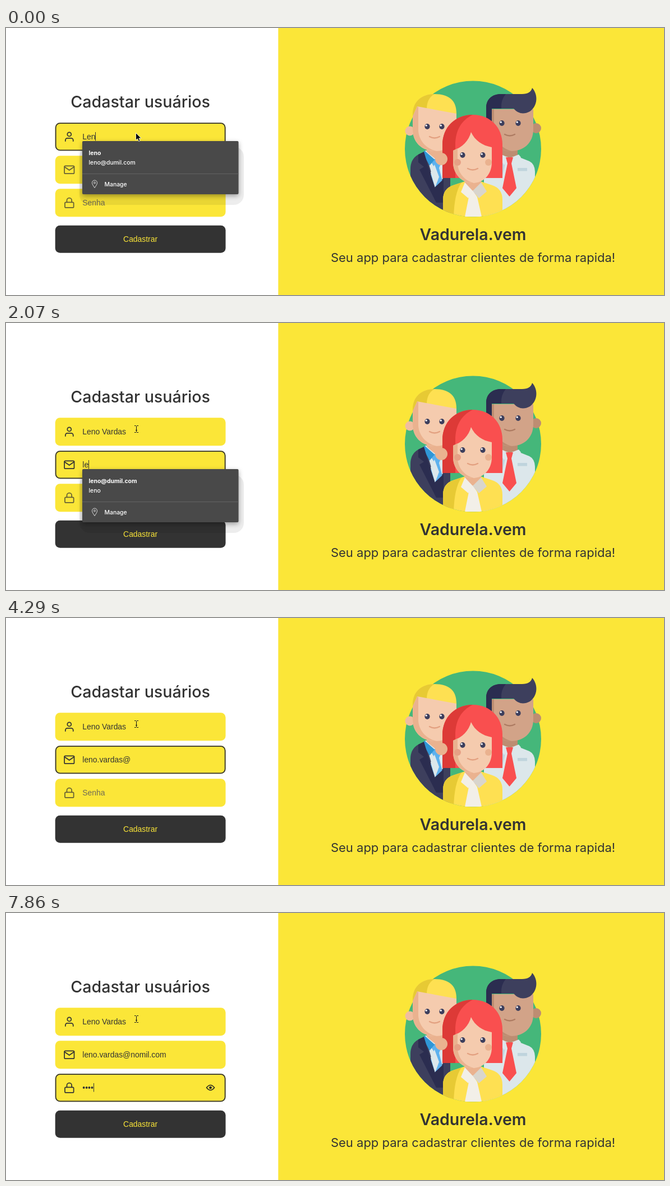
Recreate the animation shown at these times as an HTML page. Size 1173 by 477 pixels, loop 8000 ms.

```html
<!DOCTYPE html>
<html lang="pt">
<head>
<meta charset="utf-8">
<title>Cadastro</title>
<style>
  html, body { margin: 0; width: 100%; height: 100%; overflow: hidden; background: #fff; }
  svg { display: block; }
  text { font: 13.9px "Liberation Sans", Arial, sans-serif; fill: #333; white-space: pre; }
  .display { font-family: Inter, sans-serif; font-optical-sizing: none; text-anchor: middle; }
  .icon { fill: none; stroke: #333; stroke-width: 2; stroke-linecap: round; stroke-linejoin: round; }
  #popup text { font: 500 10.4px Inter, sans-serif; font-optical-sizing: none; fill: #fff; }
  #popup .strong { font-weight: 700; }
  #panel { filter: drop-shadow(0 3px 4px rgba(0, 0, 0, .35)); }
  #beam { filter: drop-shadow(0 0 .7px #fff); }
</style>
</head>
<body>
<svg width="1173" height="477" viewBox="0 0 1173 477">
  <defs>
    <clipPath id="badge">
      <rect x="700" y="90" width="265" height="126"/>
      <circle cx="832.5" cy="216" r="121.5"/>
    </clipPath>
    <g id="eye">
      <ellipse rx="4.6" ry="5" fill="#3d3f5d"/>
      <circle cx="-1.8" cy="-1.8" r="1.6" fill="#fff"/>
    </g>
    <path id="smile" d="M-9-1Q0 4 9-1" fill="none" stroke-width="2.4" stroke-linecap="round"/>
  </defs>

  <rect x="485.3" width="688" height="477" fill="#fbe638"/>
  <text class="display" x="239.6" y="141.5" style="font-size:28.6px;font-weight:500">Cadastar usuários</text>
  <text class="display" x="832.5" y="378.7" style="font-size:28.5px;font-weight:600">Vadurela.vem</text>
  <text class="display" x="832.5" y="417.5" style="font-size:22px">Seu app para cadastrar clientes de forma rapida!</text>

  <circle cx="832.5" cy="216" r="121.5" fill="#45b77a"/>
  <g clip-path="url(#badge)">
    <!-- blond man -->
    <path d="M721 345V252Q721 234 735 226L750 219H792V345Z" fill="#3d3f5d"/>
    <path d="M747 219L766 286L785 260V219Z" fill="#dce7eb"/>
    <path d="M757 238L768 232L776 240L772 250L778 274L765 285L757 262L763 248Z" fill="#5db1ee"/>
    <path d="M757 258L764 244L772 266L765 285Z" fill="#dce7eb"/>
    <path d="M746 219L764 235L755 246L743 223Z" fill="#2f96d6"/>
    <path d="M735 226L745 221L764 285L780 270V312H767L737 253L745 248L735 240Z" fill="#2b2d50"/>
    <path d="M750 212H782V230L768 236L750 221Z" fill="#eab28f"/>
    <circle cx="720" cy="184" r="8.5" fill="#f0bd9f"/>
    <path d="M725 158V155C725 131 741 118 764 118C790 118 803 130 803 152V166L790 155L733 150Z" fill="#fee052"/>
    <path d="M725 158V155C725 131 741 118 764 118C754 123 750 133 750 146L735 152Z" fill="#e7ca34"/>
    <path d="M733 140L803 153V184C803 207 786 220 765 220C742 220 725 205 725 181V158Z" fill="#f5cbae"/>
    <path d="M733 140L735 141V183C736 202 750 216 768 220C742 220 725 205 725 181V158Z" fill="#eab28f"/>
    <use href="#eye" x="751" y="176"/><use href="#eye" x="777" y="176"/>
    <use href="#smile" x="764" y="195" stroke="#e3a181"/>

    <!-- dark haired man -->
    <path d="M852 345V244L884 230H913L933 238Q943 243 943 258V345Z" fill="#dce7eb"/>
    <path d="M852 239L883 228L891 238L885 264H852Z" fill="#bfd4dd"/>
    <path d="M885 210H912V228L898 232L885 228Z" fill="#bd8d72"/>
    <path d="M883 226L897 232L888 245L879 231ZM914 226L899 232L908 245L918 231Z" fill="#dce7eb"/>
    <path d="M891 231H904L901 242L910 286L897.5 301L885 286L894 242Z" fill="#f94f4f"/>
    <rect x="912" y="250" width="17" height="5.5" fill="#bfd4dd"/>
    <circle cx="945" cy="179" r="9" fill="#bd8d72"/>
    <path d="M860 145H940V181C940 206 922 220 900 220C876 220 860 204 860 181Z" fill="#d2a388"/>
    <path d="M860 145H870V182C871 202 885 216 902 220C876 220 860 204 860 181Z" fill="#bd8d72"/>
    <path d="M856 172V143C856 127 867 118 882 118H920Q935 118 938 107C949 119 948 139 934 149Q917 158 905 144H866V166Z" fill="#3d3f5d"/>
    <path d="M856 172V143C856 127 867 118 882 118H891Q882 128 883 144H866V166Z" fill="#2b2d50"/>
    <use href="#eye" x="884" y="170"/><use href="#eye" x="913" y="170"/>
    <use href="#smile" x="898" y="191" stroke="#ae7c63"/>

    <!-- red haired woman -->
    <path d="M778 268V209C778 177 801 155 832 155S885 177 885 209V268Z" fill="#f94f4f"/>
    <path d="M778 268V209C778 177 801 155 832 155C811 165 801 184 801 209V268Z" fill="#dd3a37"/>
    <circle cx="776" cy="234" r="11" fill="#eab28f"/>
    <path d="M779 345V307Q779 287 797 281L818 274H846L867 281Q885 287 885 307V345Z" fill="#fee052"/>
    <path d="M779 345V307Q779 287 797 281L812 276Q798 296 798 345Z" fill="#e7ca34"/>
    <path d="M818 268H847V284L832 304L818 284Z" fill="#eab28f"/>
    <path d="M818 337L825 302L832 290L840 302L848 337Z" fill="#f2efe8"/>
    <path d="M818 276L832 291L824 304L811 293Z" fill="#f2efe8"/>
    <path d="M847 276L832 291L843 304L857 292Z" fill="#d9d5cd"/>
    <path d="M797 219C814 213 825 201 829 186C836 201 849 210 866 213V240C866 262 851 277 832 277C812 277 797 260 797 240Z" fill="#f5cbae"/>
    <path d="M797 219L805 215V242C806 260 818 273 834 277C812 277 797 260 797 240Z" fill="#eab28f"/>
    <circle cx="805" cy="240" r="6" fill="#e6a085"/><circle cx="860" cy="240" r="6" fill="#eab28f"/>
    <use href="#eye" x="814" y="227"/><use href="#eye" x="850" y="227"/>
    <use href="#smile" x="832" y="252" stroke="#e3a181"/>
  </g>

  <g id="fields"></g>
  <rect x="87.7" y="352.8" width="303.8" height="49" rx="8.5" fill="#333"/>
  <text x="239.6" y="381.5" text-anchor="middle" style="fill:#fbe638">Cadastrar</text>

  <g id="reveal" fill="none" stroke="#222" stroke-width="1.5">
    <path d="M357.5 312Q364.5 303 371.5 312Q364.5 321 357.5 312Z"/>
    <circle cx="364.5" cy="312" r="1.6" fill="#222"/>
  </g>
  <rect id="caret" width="1" height="15.5" fill="#333"/>

  <g id="popup">
    <rect x="131" y="212" width="293" height="104" rx="18" fill="#000" opacity=".07"/>
    <rect id="panel" x="136" y="202" width="278.5" height="95" rx="2" fill="#494949"/>
    <path d="M136 260.5H414.5" stroke="#636363"/>
    <text class="strong" x="147.5" y="226.5"></text>
    <text x="147.5" y="243.5"></text>
    <text x="175.5" y="282.5">Manage</text>
    <g fill="none" stroke="#ddd">
      <path d="M158 285.5C155 281 153.5 279 153.5 276.5A4.5 4.5 0 0 1 162.5 276.5C162.5 279 161 281 158 285.5Z"/>
      <circle cx="158" cy="276.5" r="1.5"/>
    </g>
  </g>

  <path id="arrow" d="M231.5 187.5V200.5L234.500 197.700L236.700 202.500L239 201.500L236.900 196.900H241Z" fill="#000" stroke="#fff" stroke-width=".8"/>
  <path id="beam" d="M229 183.500H231.500L232.500 184.500L233.500 183.500H236M232.500 184.500V194.500M229 195.500H231.500L232.500 194.500L233.500 195.500H236M231 191.500H234" fill="none" stroke="#111"/>
</svg>

<script>
const $ = id => document.getElementById(id);
const LOOP = 8000, TEXT_X = 136.3, ROW = 59;
const USER = 'leno', SAVED = ['leno', 'leno@dumil.com'];

const icons = [
  '<path d="M20 21v-2a4 4 0 0 0-4-4H8a4 4 0 0 0-4 4v2"/><circle cx="12" cy="7" r="4"/>',
  '<rect x="2" y="4" width="20" height="16" rx="2"/><path d="M22 6L12 13L2 6"/>',
  '<rect x="3" y="11" width="18" height="11" rx="2"/><path d="M7 11V7a5 5 0 0 1 10 0v4"/>'
];
const hints = ['', 'E-mail', 'Senha'];

$('fields').innerHTML = icons.map((icon, i) => `
  <g transform="translate(0 ${i * ROW})">
    <rect x="87.7" y="169.2" width="303.8" height="50" rx="8.5" fill="#fbe638"/>
    <rect class="focus" x="88.6" y="170.1" width="302" height="48.2" rx="7.6" fill="none" stroke="#333" stroke-width="1.8"/>
    <g class="icon" transform="translate(102.4 183.8) scale(.868)">${icon}</g>
    <text class="value" x="${TEXT_X}" y="198.8"></text>
  </g>`).join('');
const rows = [...$('fields').children].map(g => ({
  focus: g.querySelector('.focus'), icon: g.querySelector('.icon'), text: g.querySelector('.value')
}));
const popupLines = $('popup').querySelectorAll('text');

// [start ms, focused field, its text, caret hidden]
const steps = [
  [0, 0, 'Len'], [150, 0, 'Leno'], [450, 0, 'Leno '], [740, 0, 'Leno V'],
  [890, 0, 'Leno Va'], [1030, 0, 'Leno Var'], [1180, 0, 'Leno Vard'],
  [1330, 0, 'Leno Varda'], [1470, 0, 'Leno Vardas'],
  [1920, 1, '', true], [2070, 1, 'le'], [2220, 1, 'len'], [2360, 1, 'leno'],
  [2810, 1, 'leno.'], [2960, 1, 'leno.v'], [3110, 1, 'leno.var'],
  [3250, 1, 'leno.vard'], [3400, 1, 'leno.vardas'], [3850, 1, 'leno.vardas@'],
  [4290, 1, 'leno.vardas@', true], [4580, 1, 'leno.vardas@n'],
  [4730, 1, 'leno.vardas@no'], [4870, 1, 'leno.vardas@nomi'],
  [5020, 1, 'leno.vardas@nomil'], [5470, 1, 'leno.vardas@nomil.'],
  [5620, 1, 'leno.vardas@nomil.co'], [5770, 1, 'leno.vardas@nomil.com'],
  [5920, 2, ''], [6370, 2, '', true], [6960, 2, ''],
  [7260, 2, '•'], [7410, 2, '••'], [7560, 2, '•••'], [7860, 2, '••••']
];

const show = (el, on) => el.style.display = on ? '' : 'none';

function draw(t) {
  const values = ['', '', ''];
  let active, hidden;
  for (const [start, field, text, off] of steps) {
    if (start > t) break;
    values[field] = text;
    active = field;
    hidden = off;
  }
  rows.forEach(({ focus, icon, text }, i) => {
    const filled = values[i] !== '';
    show(focus, i === active);
    icon.style.opacity = filled || i === active ? 1 : .75;
    text.textContent = values[i] || hints[i];
    text.style.fill = filled ? '#333' : '#6f6a55';
  });

  const typed = values[active];
  const width = typed ? rows[active].text.getComputedTextLength() : 0;
  $('caret').setAttribute('x', Math.round(TEXT_X + width));
  $('caret').setAttribute('y', 186 + active * ROW);
  show($('caret'), !hidden);
  show($('reveal'), values[2]);

  const open = active < 2 && typed && USER.startsWith(typed.trim().toLowerCase());
  show($('popup'), open);
  if (open) {
    $('popup').setAttribute('transform', `translate(0 ${active * ROW})`);
    popupLines[0].textContent = SAVED[active];
    popupLines[1].textContent = SAVED[1 - active];
  }
  const covered = open && active === 0;
  show($('arrow'), covered);
  show($('beam'), !covered);
}

const begin = performance.now();
function tick() {
  draw((performance.now() - begin) % LOOP);
  requestAnimationFrame(tick);
}
tick();
</script>
</body>
</html>
```
